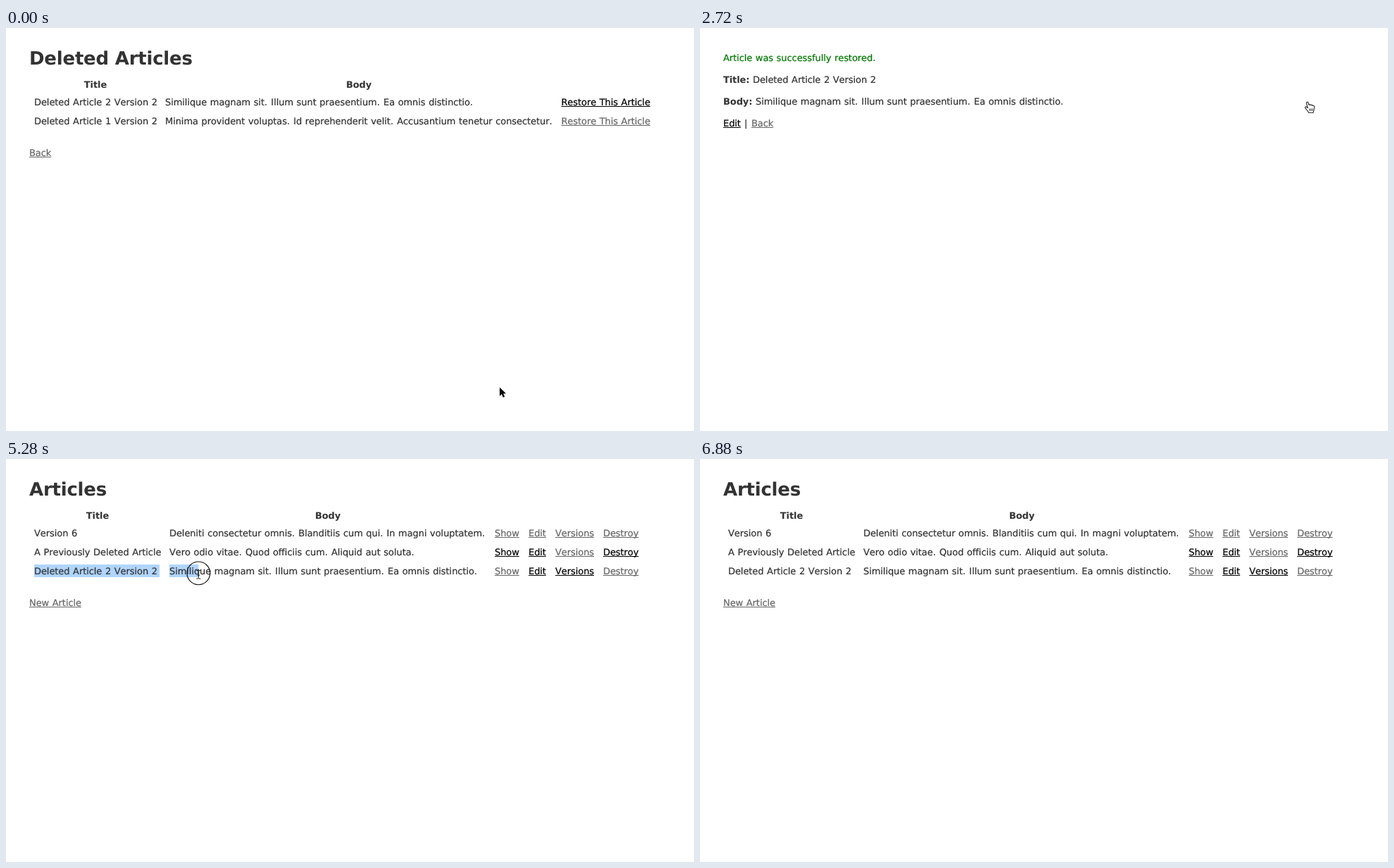
Recreate the animation shown at these times as an HTML page. Size 977x573 px, loop 7.2 s.

```html
<!DOCTYPE html>
<html lang="en">
<head>
<meta charset="utf-8">
<title>Restoring an article</title>
<style>
html, body { margin: 0; width: 100%; height: 100%; overflow: hidden; background: #fff; }
svg { display: block; color: #333; }
text {
  font: 13px "DejaVu Sans", Verdana, sans-serif; font-kerning: none;
  letter-spacing: -.07px; word-spacing: .55px; text-rendering: geometricPrecision;
  fill: currentColor; stroke: currentColor; stroke-width: .22px;
}
.dot { letter-spacing: .54px; }
.bold { font-weight: bold; letter-spacing: -.1px; word-spacing: 0; stroke: none; }
.h1 { font-size: 26px; font-weight: bold; letter-spacing: -.22px; word-spacing: 0; stroke: none; }
.mid { text-anchor: middle; }
.ok { color: #007800; }
.link { color: #000; }
.link.seen { color: #666; }
.link.hover { color: #fff; }
.link .line { fill: currentColor; }
.link .back { fill: none; }
.link.hover .back { fill: #000; }
.sel { fill: #b0d5ff; }
.link .sel { fill: #6695d0; }
</style>
</head>
<body>
<svg id="stage" width="977" height="573" viewBox="0 0 977 573">
  <g id="pages"></g>
  <g id="pointer">
    <circle id="ring" r="16.4" fill="none" stroke="#111" stroke-width="1.1"/>
    <path id="arrow" d="M0 0V12.2L2.9 9.5 4.9 14.2 7.2 13.2 5.2 8.7H9Z" stroke="#fff" stroke-width="1" paint-order="stroke"/>
    <g id="hand" transform="translate(-7.5 -8.5)" fill="#fff" stroke="#333" stroke-width="1.2" stroke-linejoin="round">
      <path d="M2.6 2C2.6.4 4.7.3 5.2 1.7L6.5 5.2C6.8 4 8.6 4 9 5.3 9.4 4.5 11.1 4.7 11.4 6 12.2 5.3 13.8 6 14 7.4 14.2 10 13.2 12.4 12.2 16H5.8C5.2 13.5 2.5 11.5 1 9.2.3 7.8 1.8 6.8 3.1 7.9L4.6 9.2Z"/>
      <path d="M7.2 10V13.4M9.2 10V13.4M11.2 10V13.4" stroke-width="1"/>
    </g>
    <path id="beam" d="M-3-4Q0-4 0-2.5Q0-4 3-4M0-2.5V6.5M-3 8Q0 8 0 6.5Q0 8 3 8M-1.5 3H1.5" fill="none" stroke="#222" stroke-width="1"/>
  </g>
</svg>
<script>
const $ = id => document.getElementById(id);

function add(parent, tag, attrs, label) {
  const el = document.createElementNS("http://www.w3.org/2000/svg", tag);
  for (const name in attrs) el.setAttribute(name, attrs[name]);
  if (label) el.textContent = label;
  return parent.appendChild(el);
}

const newPage = () => add($("pages"), "g", {});

// Full stops get a little more room than other letters
function write(page, x, y, label, cls = "") {
  const text = add(page, "text", { x, y, class: cls });
  for (const part of label.split(/(\.)/)) {
    if (part) add(text, "tspan", part === "." ? { class: "dot" } : {}, part);
  }
  return text;
}

function link(page, x, y, label, seen) {
  const g = add(page, "g", { class: seen ? "link seen" : "link" });
  const back = add(g, "rect", { class: "back", x, y: y - 13, height: 16 });
  const width = write(g, x, y, label).getComputedTextLength();
  back.setAttribute("width", width);
  add(g, "rect", { class: "line", x, y: y + 1, width, height: 1 });
  return g;
}

// Selection strip that grows from x up to a limit
function strip(parent, x, end, before) {
  const rect = add(parent, "rect", { class: "sel", x, y: 150, height: 18 });
  if (before) parent.insertBefore(rect, before);
  return to => rect.setAttribute("width", Math.max(0, Math.min(to, end) - x));
}

const article = "Deleted Article 2 Version 2";
const body = "Similique magnam sit. Illum sunt praesentium. Ea omnis distinctio.";

const deleted = newPage();
write(deleted, 33, 52, "Deleted Articles", "h1");
write(deleted, 127, 85, "Title", "bold mid");
write(deleted, 501, 85, "Body", "bold mid");
write(deleted, 40, 110, article);
write(deleted, 226, 110, body);
write(deleted, 40, 137, "Deleted Article 1 Version 2");
write(deleted, 226, 137, "Minima provident voluptas. Id reprehenderit velit. Accusantium tenetur consectetur.");
const restore = link(deleted, 788.4, 110, "Restore This Article");
link(deleted, 788.4, 137, "Restore This Article", true);
link(deleted, 33, 182, "Back", true);

const restored = newPage();
write(restored, 33, 47, "Article was successfully restored.", "ok");
write(restored, 33, 78, "Title:", "bold");
write(restored, 75, 78, article);
write(restored, 33, 109, "Body:", "bold");
write(restored, 79, 109, body);
link(restored, 33, 140, "Edit");
write(restored, 63, 140, "|");
const back = link(restored, 73, 140, "Back", true);

const list = newPage();
const strips = [strip(list, 40, 218), strip(list, 232, 676)];
write(list, 33, 52, "Articles", "h1");
write(list, 130, 85, "Title", "bold mid");
write(list, 457, 85, "Body", "bold mid");
const columns = [[694, "Show"], [742, "Edit"], [780, "Versions"], [848, "Destroy"]];
// The last string marks visited links with 1
const shows = [
  ["Version 6", "Deleniti consectetur omnis. Blanditiis cum qui. In magni voluptatem.", "1111"],
  ["A Previously Deleted Article", "Vero odio vitae. Quod officiis cum. Aliquid aut soluta.", "0010"],
  [article, body, "1001"]
].map(([title, text, seen], row) => {
  const y = 110 + row * 27;
  write(list, 40, y, title);
  write(list, 232, y, text);
  return columns.map(([x, label], i) => link(list, x, y, label, seen[i] === "1"))[0];
});
const show = shows[2];
strips.push(strip(show, 694, 703, show.querySelector("text")));
link(list, 33, 209, "New Article", true);

const pages = [deleted, restored, list];
const LOOP = 7200, STEP = 160;

// Pointer path: time, x, y
const path = [
  [0, 701, 511], [160, 713, 489], [960, 713, 489], [1440, 864, 111],
  [1760, 864, 111], [1920, 866, 113], [3200, 866, 113], [3680, 98, 144],
  [4320, 98, 144], [4640, 92, 145], [4960, 40, 162], [5760, 703, 163],
  [6080, 703, 163], [6720, 735, 549], [LOOP, 735, 549]
];

function pointerAt(t) {
  const i = path.findIndex(key => key[0] > t);
  const [t0, x0, y0] = path[i - 1], [t1, x1, y1] = path[i];
  const k = (t - t0) / (t1 - t0), e = k * k * (3 - 2 * k);
  return [x0 + (x1 - x0) * e, y0 + (y1 - y0) * e];
}

const display = (el, on) => el.style.display = on ? "" : "none";

function draw(now) {
  const t = Math.floor(now % LOOP / STEP) * STEP;
  const during = (from, to) => t >= from && t < to;
  const current = t < 2720 ? 0 : t < 4320 ? 1 : 2;
  pages.forEach((page, i) => display(page, i === current));

  restore.classList.toggle("hover", during(1440, 2720));
  back.classList.toggle("hover", during(3680, 4320));
  show.classList.toggle("hover", during(5760, 6240));

  const [x, y] = pointerAt(t);
  const hand = during(1440, 3360) || during(3680, 4480) || during(6080, 6240);
  const beam = during(4960, 6080);
  $("pointer").setAttribute("transform", `translate(${x} ${y})`);
  display($("pointer"), t < 6880);
  display($("hand"), hand);
  display($("beam"), beam);
  display($("arrow"), !hand && !beam);
  display($("ring"), during(2240, 2400) || during(3840, 4000) || beam);
  strips.forEach(grow => grow(during(4960, 6400) ? x : 0));
}

const start = performance.now();
function tick() {
  draw(performance.now() - start);
  requestAnimationFrame(tick);
}
tick();
</script>
</body>
</html>
```
